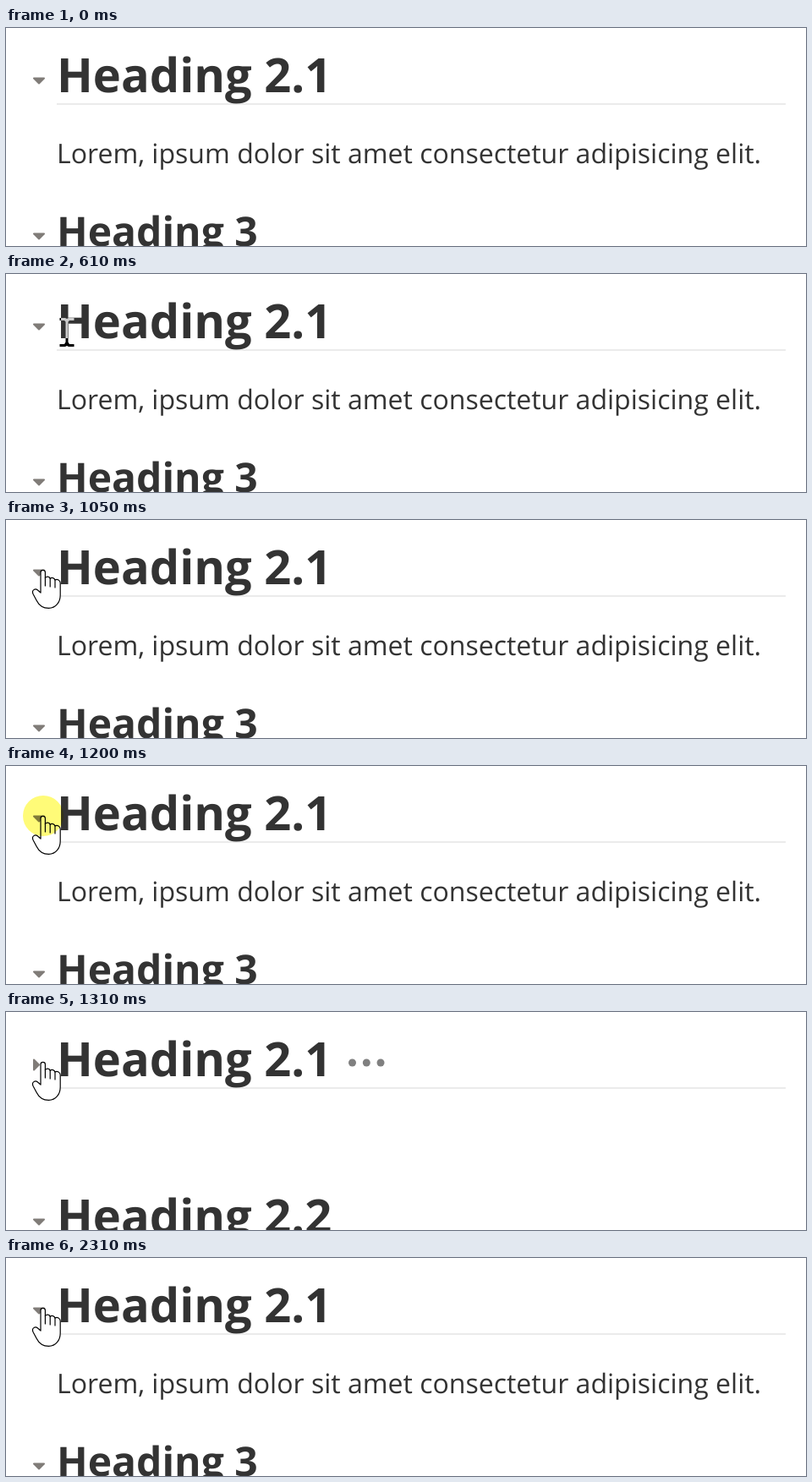
An HTML page for the animation above (2900 ms loop, 946 px wide and 258 px high).

```html
<!DOCTYPE html>
<html lang="en">
<head>
<meta charset="utf-8">
<title>Folding headings</title>
<style>
  html, body { margin: 0; width: 100%; height: 100%; overflow: hidden; background: #fff; }
  svg { display: block; font: 32.04px "Open Sans", sans-serif; fill: #333; text-rendering: geometricPrecision; }
  .h2 { font-size: 56px; font-weight: 700; }
  .h3 { font-size: 48px; font-weight: 700; }
  .fold { fill: #807c78; stroke: #807c78; stroke-width: 2; stroke-linejoin: round; }
  .hand { fill: #fff; stroke: #000; stroke-width: 1.2; stroke-linejoin: round; stroke-linecap: round; }
  #beam { fill: #fff; mix-blend-mode: difference; }
  #click { fill: #fffb78; mix-blend-mode: multiply; }
</style>
</head>
<body>
<svg width="946" height="258" viewBox="0 0 946 258">
  <defs>
    <path id="down" class="fold" d="M33 59.5H45L39 65.5Z"/>
  </defs>
  <rect width="946" height="258" fill="#fff"/>
  <rect x="60" y="89" width="862" height="2" fill="#ebebeb"/>
  <text class="h2" x="60" y="76">Heading 2.1</text>

  <g id="open">
    <use href="#down"/>
    <text x="60" y="160">Lorem, ipsum dolor sit amet consectetur adipisicing elit.</text>
    <use href="#down" y="184"/>
    <text class="h3" x="60" y="258">Heading 3</text>
  </g>

  <g id="folded">
    <path class="fold" d="M33 56.5V68.5L39 62.5Z"/>
    <g fill="#808080">
      <circle cx="409.5" cy="60" r="4.5"/>
      <circle cx="426.3" cy="60" r="4.5"/>
      <circle cx="443" cy="60" r="4.5"/>
    </g>
    <use href="#down" y="186"/>
    <text class="h2" x="60" y="262">Heading 2.2</text>
  </g>

  <path id="beam" d="M-8.5 -17H-2L0 -16L2 -17H8.5V-14H3L1.5 -12.5V11.5L3 14H8.5V17H2L0 16L-2 17H-8.5V14H-3L-1.5 11.5V-12.5L-3 -14H-8.5Z"/>
  <g id="hand" class="hand">
    <path d="M41 86V62a2.7 2.7 0 0 1 5.4 0V68.5c1.5 -2.2 5 -1.8 5.8 .8c2 -1.6 5 -.8 5.8 1.7c2.6 -1.4 6.2 .2 6.2 3.5V89C64.2 97 59 104.4 50.5 104.4C42 104.4 38 99 36 95L32 87.5C30 83 34.5 80.5 37.5 83Z"/>
    <path fill="none" d="M46.4 68V78M52.2 69.3V79M58 71V80"/>
  </g>
  <circle id="click" cx="44" cy="59" r="24"/>
</svg>
<script>
  const LOOP = 2900, STEP = 70;
  const get = id => document.getElementById(id);
  const [open, folded, beam, hand, click] = ["open", "folded", "beam", "hand", "click"].map(get);
  const show = (el, on) => el.style.display = on ? "" : "none";
  const move = (el, x, y) => el.setAttribute("transform", `translate(${x} ${y})`);
  const within = (t, from, to) => t >= from && t < to;

  // The pointer glides to the heading, slowing down, then edges left.
  function beamAt(t) {
    if (t >= 770) return [64, 65];
    if (t >= 710) return [69, 67];
    const u = Math.min(1, Math.floor((t - 260) / STEP) / 5);
    const rest = (1 - u) ** 1.5;
    return [72 + 622 * rest, 69 + 177 * rest];
  }

  function draw(t) {
    const isFolded = within(t, 1310, 2310);
    show(open, !isFolded);
    show(folded, isFolded);
    show(beam, within(t, 260, 840));
    if (within(t, 260, 840)) move(beam, ...beamAt(t));
    show(hand, t >= 840);
    const left = Math.max(0, 3 - Math.floor((t - 840) / STEP)) / 3;
    move(hand, 11 * left, -11 * left);
    show(click, within(t, 1200, 1250) || within(t, 2180, 2310));
  }

  const start = performance.now();
  function tick() {
    draw((performance.now() - start) % LOOP);
    requestAnimationFrame(tick);
  }
  tick();
</script>
</body>
</html>
```
